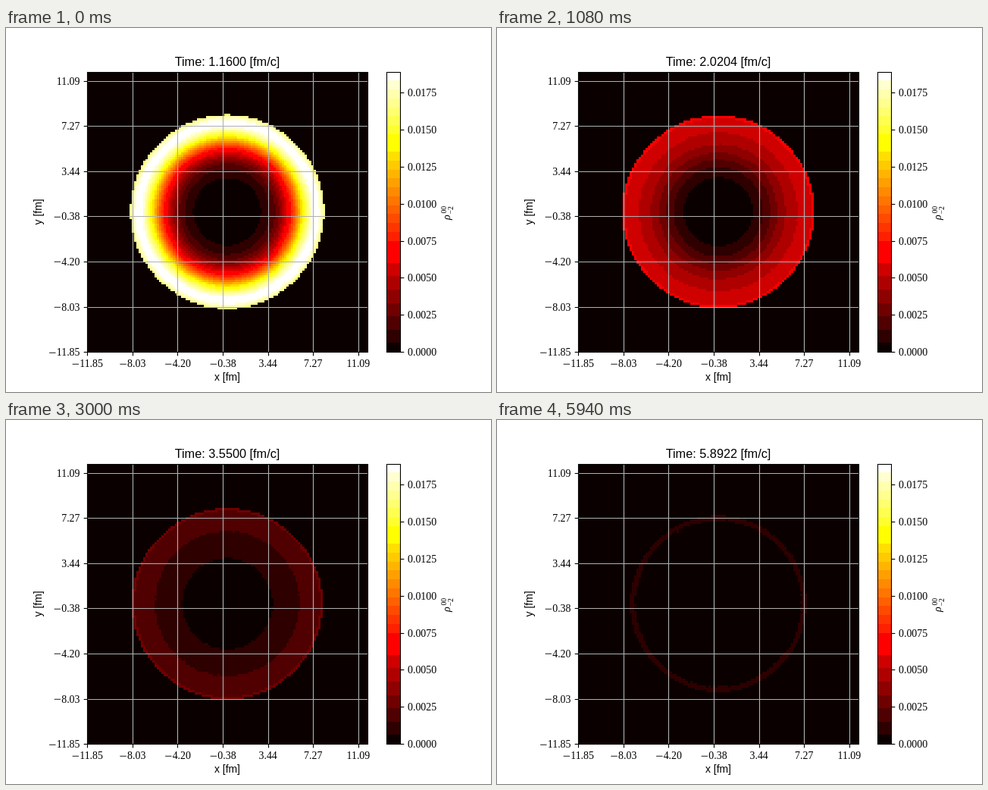
Animation of 640x480 px, one loop 6 s. Source, as an HTML page with a canvas:

```html
<!DOCTYPE html>
<html lang="en">
<head>
<meta charset="utf-8">
<title>Density over time</title>
<style>
  html, body { margin: 0; width: 100%; height: 100%; overflow: hidden; background: #fff; }
  canvas { display: block; }
</style>
</head>
<body>
<canvas id="stage" width="640" height="480"></canvas>
<script>
const ctx = document.getElementById('stage').getContext('2d');
const STEP = 60, STEPS = 100, CELLS = 125, MID = 62;
const LEFT = 107.2, TOP = 57.6, SIZE = 369.6, RIGHT = LEFT + SIZE, BOTTOM = TOP + SIZE;
const CELL = SIZE / CELLS, FIELD_TOP = TOP - 0.4;
const TICK = 4.86, TICKS = 7, TICK_GAP = SIZE * 20 / 124;
const BAR_X = 501.6, BAR_W = 18.48, V_MAX = 0.0189;
const SERIF = '"Liberation Serif", serif', SANS = '"Liberation Sans", sans-serif';

const clamp = v => Math.max(0, Math.min(1, v));
const snap = v => Math.floor(v + 0.5) + 0.5;
const columnAt = i => Math.round(LEFT + i * CELL);
const rowAt = j => Math.round(FIELD_TOP + j * CELL);

// Disc radius in cells: slow shrink that speeds up at the end.
function discRadius(n) {
  const x = n / (STEPS - 1);
  return 43.13 - 0.8 * x ** 0.6 - 3.1 * x ** 5;
}

// Density as a share of the maximum; u is the radius, 1 near the rim.
function densityAt(n) {
  const damping = Math.min(24.2, 0.7 + 0.12 * n + 13.3 * (n / 82) ** 6);
  const power = 2.5 + 9.5 * Math.exp(-n / 11);
  return u => u ** 4 / (0.465 + damping * u ** power);
}

function grain(i, j) {
  const v = Math.sin(i * 12.9898 + j * 78.233) * 43758.5453;
  return v - Math.floor(v) - 0.5;
}

function channel(v, bins) {
  const bin = Math.min(bins - 1, Math.floor(clamp(v) * bins));
  if (bin === 0) return 0;
  return bin === bins - 1 ? 255 : Math.round((bin + 0.5) * 255 / bins);
}

// Black, red, yellow, white ramp in discrete steps.
function heat(s) {
  const r = Math.max(11, channel(0.0416 + 0.9584 * s / 0.365, 8) - 2 * (s < 0.08));
  const g = channel((s - 0.365) / 0.381, 12);
  const b = channel((s - 0.746) / 0.254, 8);
  return `rgb(${r},${g},${b})`;
}

function line(x1, y1, x2, y2, color = '#000') {
  ctx.strokeStyle = color;
  ctx.beginPath();
  ctx.moveTo(x1, y1);
  ctx.lineTo(x2, y2);
  ctx.stroke();
}

function frame(x, y, w, h) {
  ctx.strokeStyle = '#000';
  ctx.strokeRect(snap(x), snap(y), snap(x + w) - snap(x), snap(y + h) - snap(y));
}

function text(str, x, y, font, align = 'left') {
  ctx.fillStyle = '#000';
  ctx.font = font;
  ctx.textAlign = align;
  ctx.fillText(str, x, y);
}

function upright(x, y, draw) {
  ctx.save();
  ctx.translate(x, y);
  ctx.rotate(-Math.PI / 2);
  draw();
  ctx.restore();
}

// shift: share of the label's width that lies left of x.
function tickLabel(value, x, y, shift) {
  const font = '13.9px ' + SERIF, digits = Math.abs(value).toFixed(2);
  const minusWidth = value < 0 ? 10.8 : 0;
  ctx.font = font;
  const start = x - shift * (ctx.measureText(digits).width + minusWidth);
  if (value < 0) text('\u2212', start + 0.3, y + 1.5, '18px ' + SERIF);
  text(digits, start + minusWidth, y, font);
}

function drawField(n) {
  const radius = discRadius(n), density = densityAt(n);
  const rim = 1 + 0.25 * (1 - Math.exp(-n / 4));
  const rough = 0.03 * Math.min(1, n / 50);
  ctx.fillStyle = heat(0);
  ctx.fillRect(107, 58, 370, 370);
  for (let j = 0; j < CELLS; j++) {
    for (let i = 0; i < CELLS; i++) {
      const d = Math.hypot(i - MID, j - MID - 0.1);
      if (d > radius) continue;
      const edge = radius - d < 1.1 ? rim : 1;
      const x = columnAt(i), y = rowAt(j);
      ctx.fillStyle = heat(density(d * CELL / 128) * edge * (1 + rough * grain(i, j)));
      ctx.fillRect(x, y, columnAt(i + 1) - x, rowAt(j + 1) - y);
    }
  }
}

function drawAxes() {
  const x0 = snap(LEFT), x1 = snap(RIGHT), y0 = snap(TOP), y1 = snap(BOTTOM);
  for (let k = 0; k < TICKS; k++) {
    const x = LEFT + k * TICK_GAP, y = BOTTOM - k * TICK_GAP;
    const value = -11.85 + k * 3.8235;
    line(snap(x), y0, snap(x), y1, '#b0b0b0');
    line(x0, snap(y), x1, snap(y), '#b0b0b0');
    line(snap(x), y1, snap(x), y1 + TICK);
    line(x0, snap(y), x0 - TICK, snap(y));
    tickLabel(value, x, 447, 0.5);
    tickLabel(value, 97.5, y + 5, 1);
  }
  frame(LEFT, TOP, SIZE, SIZE);
  text('x [fm]', 292, 465, '13.9px ' + SANS, 'center');
  upright(47, 242.4, () => text('y [fm]', 0, 0, '13.9px ' + SANS, 'center'));
}

function drawBar() {
  for (let y = 58; y < 428; y++) {
    ctx.fillStyle = heat((BOTTOM - y - 0.5) / SIZE);
    ctx.fillRect(502, y, 18, 1);
  }
  frame(BAR_X, TOP, BAR_W, SIZE);
  const x = snap(BAR_X + BAR_W);
  for (let v = 0; v < V_MAX; v += 0.0025) {
    const y = BOTTOM - v / V_MAX * SIZE;
    line(x, snap(y), x + TICK, snap(y));
    text(v.toFixed(4), 530, y + 5, '13.9px ' + SERIF);
  }
  upright(586, 253, () => {
    text('ρ', 0, 0, 'italic 13.9px ' + SERIF);
    text('00', 8.5, -5.5, '9.7px ' + SERIF);
    text('\u22122', 7.5, 4, '9.7px ' + SERIF);
  });
}

function draw(n) {
  ctx.fillStyle = '#fff';
  ctx.fillRect(0, 0, 640, 480);
  ctx.lineWidth = 1.11;
  drawField(n);
  drawAxes();
  drawBar();
  const time = (1.16 + 0.0478 * n).toFixed(4);
  text(`Time: ${time} [fm/c]`, 292, 49.5, '16.3px ' + SANS, 'center');
}

let shown = -1;
function tick() {
  const n = Math.floor(performance.now() / STEP) % STEPS;
  if (n !== shown) draw(shown = n);
  requestAnimationFrame(tick);
}
tick();
</script>
</body>
</html>
```
